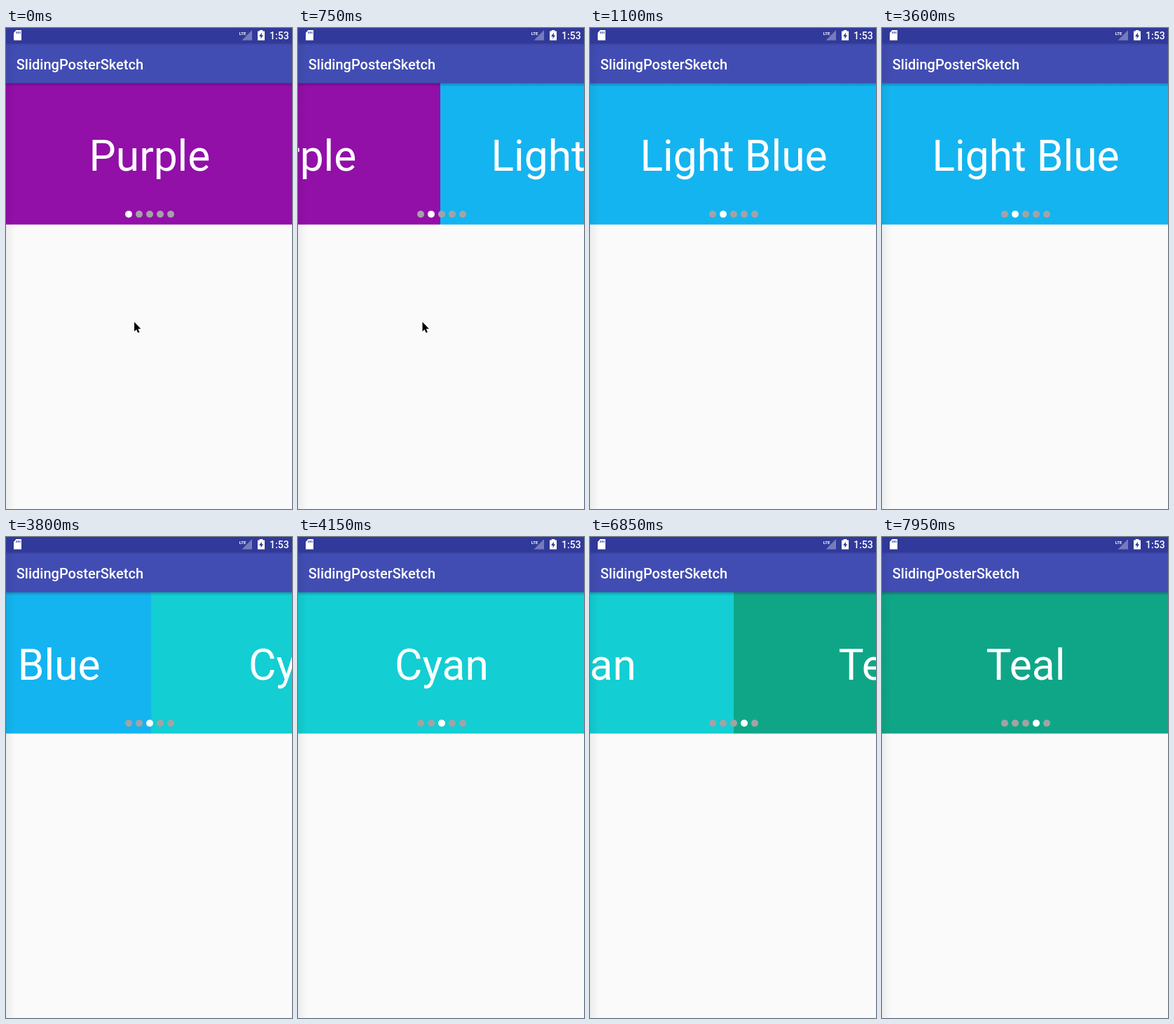
These frames come from a looping animation (408 px wide and 684 px high, 8000 ms). An HTML page with a canvas:

```html
<!DOCTYPE html>
<html lang="en">
<head>
<meta charset="utf-8">
<title>Banner</title>
<style>
  html, body { margin: 0; width: 100%; height: 100%; overflow: hidden; background: #fafafa; }
  canvas { display: block; width: 408px; height: 684px; }
</style>
</head>
<body>
<canvas id="stage" width="408" height="684"></canvas>
<script>
const ctx = document.getElementById('stage').getContext('2d');
const W = 408, H = 684, LOOP = 8000, TICK = 50;
const TOOLBAR_END = 78.5;
const BANNER = { x: -1, y: 78, w: 412, h: 201.5 };
const PAGES = [
  { label: 'Purple', color: '#920fa8' },
  { label: 'Light Blue', color: '#14b4f0' },
  { label: 'Cyan', color: '#13ced3' },
  { label: 'Teal', color: '#0fa688' }
];
const SLIDE_STARTS = [549, 3601, 6650];
const SLIDE_MS = 400;

function rect(x, y, w, h, color) {
  ctx.fillStyle = color;
  ctx.fillRect(x, y, w, h);
}

function polygon(points, color, stroke) {
  ctx.beginPath();
  points.forEach(([x, y]) => ctx.lineTo(x, y));
  ctx.closePath();
  if (stroke) {
    ctx.strokeStyle = stroke;
    ctx.lineWidth = 2;
    ctx.lineJoin = 'round';
    ctx.stroke();
  }
  ctx.fillStyle = color;
  ctx.fill();
}

function text(str, x, y, font, align = 'left') {
  ctx.font = `${font} Roboto, sans-serif`;
  ctx.textAlign = align;
  ctx.fillStyle = '#fff';
  ctx.fillText(str, x, y);
}

function shade(x0, y0, x1, y1, alpha, x, y, w, h) {
  const g = ctx.createLinearGradient(x0, y0, x1, y1);
  g.addColorStop(0, `rgba(0,0,0,${alpha})`);
  g.addColorStop(1, 'rgba(0,0,0,0)');
  rect(x, y, w, h, g);
}

function easeInOut(u) {
  return (1 - Math.cos(Math.PI * Math.min(1, Math.max(0, u)))) / 2;
}

function drawStatusBar() {
  const bar = '#31399a';
  rect(0, 0, W, 22, bar);
  // memory card
  polygon([[14.5, 3], [22, 3], [22, 17.5], [11, 17.5], [11, 7]], '#fff');
  for (let i = 0; i < 3; i++) rect(14.5 + i * 2.4, 5, 1.1, 3, bar);
  // signal
  polygon([[351, 3], [351, 17.5], [336.5, 17.5]], '#757bbb');
  text('LTE', 332.7, 9.5, '700 6px');
  // battery
  rect(361.7, 3, 4.6, 2, '#fff');
  rect(359, 4.5, 10, 13, '#fff');
  polygon([[364.8, 6.5], [361.2, 12], [363.5, 12], [363.5, 15.5], [367, 10.2], [364.8, 10.2]], bar);
  text('1:53', 403.7, 16, '500 14px', 'right');
}

function drawToolbar() {
  rect(0, 22, W, TOOLBAR_END - 22, '#414db2');
  shade(0, 22, 0, 25, 0.12, 0, 22, W, 3);
  text('SlidingPosterSketch', 14.7, 58.5, '500 20px');
}

function drawPage(page, x) {
  rect(x, BANNER.y, BANNER.w, BANNER.h, page.color);
  text(page.label, x + BANNER.w / 2, 203, '400 60.5px', 'center');
}

function drawBanner(t) {
  const position = SLIDE_STARTS.reduce((sum, s) => sum + easeInOut((t - s) / SLIDE_MS), 0);
  const active = SLIDE_STARTS.filter(s => t >= s).length;
  PAGES.forEach((page, i) => {
    const x = Math.round(BANNER.x + (i - position) * BANNER.w);
    if (x < W && x + BANNER.w > 0) drawPage(page, x);
  });
  for (let i = 0; i < 5; i++) {
    ctx.beginPath();
    ctx.arc(175 + i * 15, 264.7, 5, 0, Math.PI * 2);
    ctx.fillStyle = i === active ? '#fff' : '#a3a3a5';
    ctx.fill();
  }
}

function drawCursor(t) {
  if (t >= 1050) return;
  let x = t < 350 ? 183 : 182;
  if (t >= 550) x -= 4.5 * Math.min(1, (t - 550) / 200);
  if (t > 750) x -= 190 * ((t - 750) / 300) ** 2;
  const shape = [[0, 0], [0, 13.5], [3.1, 10.7], [5.2, 15.5], [7.4, 14.5], [5.3, 9.8], [9.4, 9.8]];
  polygon(shape.map(([dx, dy]) => [x + dx, 418 + dy]), '#000', '#fff');
}

function draw(t) {
  rect(0, 0, W, H, '#fafafa');
  drawBanner(t);
  shade(0, TOOLBAR_END, 0, 83.5, 0.22, 0, BANNER.y, W, 6);
  drawToolbar();
  drawStatusBar();
  shade(0, 0, 13, 0, 0.06, 0, 22, 13, H - 22);
  drawCursor(t);
}

const start = performance.now();
function frame() {
  const t = (performance.now() - start) % LOOP;
  draw(Math.floor(t / TICK) * TICK);
  requestAnimationFrame(frame);
}
frame();
</script>
</body>
</html>
```
